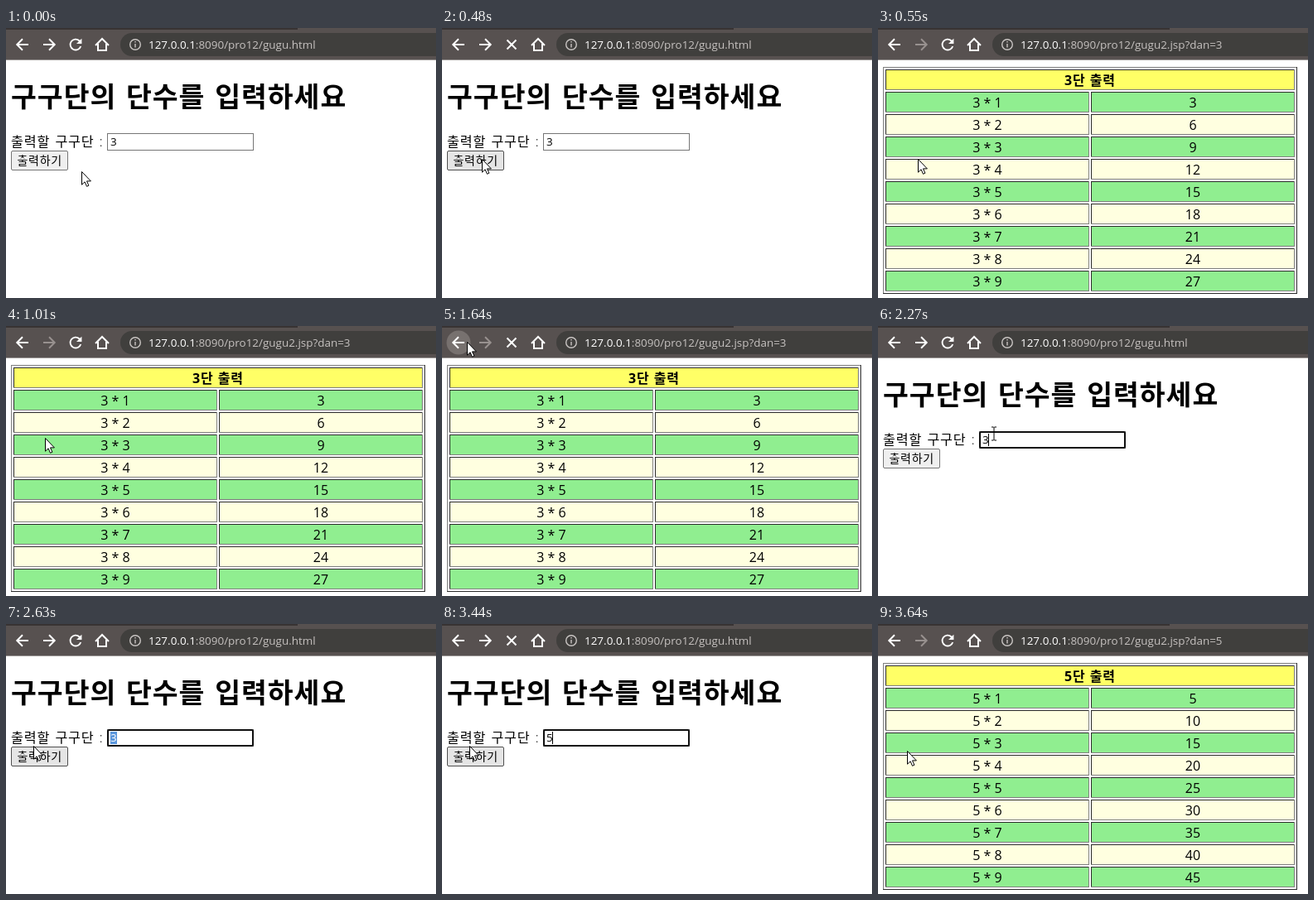
An HTML page that plays this animation: 519 px wide and 326 px high, repeating every 3.84 s.

```html
<!DOCTYPE html>
<html lang="ko">
<head>
<meta charset="utf-8">
<title>구구단</title>
<style>
  html, body { margin: 0; width: 100%; height: 100%; overflow: hidden; background: #fff; }
  svg { display: block; width: 519px; height: 326px; }
  text { font-family: "Open Sans", "Noto Sans CJK KR", "Noto Sans CJK", sans-serif; font-size: 16px; white-space: pre; }
  rect { shape-rendering: crispEdges; }
  .round { shape-rendering: auto; }
  .icon { fill: #fff; }
  .line { fill: none; stroke: #fff; stroke-width: 2; }
  .mid { text-anchor: middle; }
  #title { font-size: 33.5px; font-weight: 700; letter-spacing: 1px; word-spacing: 2px; }
  #label { font-size: 16.2px; font-weight: 300; letter-spacing: .8px; word-spacing: 1.3px; }
  #value { font-size: 13.4px; }
  #url { font-size: 13.45px; fill: #c6c2c0; }
  #url .host { fill: #fff; }
  #button text { font-size: 14px; font-weight: 300; letter-spacing: .7px; }
  #button rect { fill: #efefef; stroke: #767676; }
  #button.hover rect { fill: #e5e5e5; stroke: #4f4f4f; }
  #button.press rect { fill: #f5f5f5; stroke: #8d8d8d; }
</style>
</head>
<body>
<svg viewBox="0 0 519 326">
  <g id="form">
    <text id="title" x="6" y="95">구구단의 단수를 입력하세요</text>
    <text id="label" x="6" y="142.5">출력할 구구단 :</text>
    <rect id="box" x="122.5" y="127.5" width="176" height="20" fill="#fff" stroke="#767676"/>
    <rect id="ring" class="round" x="123" y="128" width="175" height="19" rx="1.5" fill="#fff" stroke="#101010" stroke-width="2"/>
    <rect id="mark" x="126" y="130" width="8" height="15" fill="#5a96dc"/>
    <text id="value" x="126" y="142">3</text>
    <rect id="caret" x="133" y="130" width="1" height="15"/>
    <g id="button">
      <rect class="round" x="6.5" y="148.5" width="68" height="23" rx="1.5"/>
      <text x="13.5" y="165">출력하기</text>
    </g>
  </g>
  <g id="table"></g>

  <rect width="519" height="38" fill="#575150"/>
  <rect y="38" width="519" height="1" fill="#9a9695"/>
  <rect width="352" height="2" fill="#383333"/>
  <rect class="round" x="138" y="6" width="420" height="28" rx="14" fill="#403f3d"/>
  <circle id="halo" cx="20" cy="20" r="14.5" fill="#77716f"/>
  <path class="line" d="M27 20H14M20 13.3L13.3 20 20 26.7"/>
  <path id="forward" class="line" d="M45 20H58M52 13.3L58.7 20 52 26.7"/>
  <path id="reload" class="icon" transform="translate(73 9) scale(.92)" d="M17.65 6.35A8 8 0 1 0 19.73 14h-2.08A6 6 0 1 1 16.22 7.78L13 11h7V4z"/>
  <path id="stop" class="line" d="M78.5 14.5l11 11m0-11l-11 11"/>
  <path class="line" d="M108 21L116 13 124 21M111 19V27H121V19"/>
  <g fill="none" stroke="#c9c5c3" stroke-width="1.4">
    <circle cx="156" cy="20" r="6.3"/>
    <path d="M156 19v4.5M156 16v1.6"/>
  </g>
  <text id="url" x="172" y="25"><tspan class="host">127.0.0.1</tspan><tspan id="path"></tspan></text>

  <g id="cursor">
    <path id="arrow" d="M.5.5V16.2L4.1 12.8 6.5 18.3 8.9 17.2 6.5 11.9H11.4Z" fill="#fff" stroke="#000"/>
    <path id="beam" d="M-3-8h2.5l.5.5.5-.5H3M0-7.5V7.5M-3 8h2.5l.5-.5.5.5H3" fill="none" stroke="#000"/>
  </g>
</svg>
<script>
const LOOP = 3840, STEP = 70;
const $ = id => document.getElementById(id);
const show = (id, on) => { $(id).style.display = on ? '' : 'none'; };
const within = (t, a, b) => t >= a && t < b;

// Each move: start time, number of steps, destination x and y
const moves = [
  [70, 3, 48, 158],
  [1010, 1, 47, 135],
  [1080, 7, 24, 21],
  [1570, 2, 30, 19],
  [1780, 5, 108, 89],
  [2130, 2, 140, 130],
  [2340, 5, 33, 147],
  [3570, 2, 35, 153]
];

function cursorAt(t) {
  let x = 91, y = 173;
  for (const [start, steps, tx, ty] of moves) {
    if (t < start) break;
    const u = Math.min(1, (Math.floor((t - start) / STEP) + 1) / steps);
    const k = 1 - (1 - u) ** 1.4;
    x += (tx - x) * k;
    y += (ty - y) * k;
  }
  return [Math.round(x), Math.round(y)];
}

// One pixel bevel: light and dark sides around a fill
function bevel(x, y, w, h, topLeft, bottomRight, fill) {
  const rect = (x, y, w, h, c) => `<rect x="${x}" y="${y}" width="${w}" height="${h}" fill="${c}"/>`;
  return rect(x, y, w, h, bottomRight) + rect(x, y, w - 1, h - 1, topLeft) +
    rect(x + 1, y + 1, w - 2, h - 2, fill);
}

function tableMarkup(dan) {
  const dark = '#2c2c2c', gray = '#808080';
  const cell = (x, row, w, fill, text, style = '') => {
    const y = 50 + 27 * row;
    return bevel(x, y, w, 25, dark, gray, fill) +
      `<text class="mid" x="${x + w / 2}" y="${y + 19}" style="${style}">${text}</text>`;
  };
  let out = bevel(6, 47, 500, 274, gray, dark, '#fff') +
    cell(9, 0, 494, '#ffff66', dan + '단 출력', 'font-weight:700;letter-spacing:.9px');
  for (let i = 1; i < 10; i++) {
    const fill = i % 2 ? '#90ee90' : '#ffffe0';
    out += cell(9, i, 246, fill, `${dan} * ${i}`) + cell(257, i, 246, fill, dan * i);
  }
  return out;
}

let shown = -1;
function setPage(dan) {
  if (dan === shown) return;
  shown = dan;
  show('form', !dan);
  show('table', dan);
  if (dan) $('table').innerHTML = tableMarkup(dan);
  $('path').textContent = ':8090/pro12/' + (dan ? 'gugu2.jsp?dan=' + dan : 'gugu.html');
  $('forward').style.stroke = dan ? '#98918f' : '#fff';
}

function draw(t) {
  const [x, y] = cursorAt(t);
  setPage(within(t, 550, 1710) ? 3 : t >= 3510 ? 5 : 0);

  const loading = within(t, 480, 550) || within(t, 1640, 1710) || within(t, 3440, 3510);
  show('stop', loading);
  show('reload', !loading);
  show('halo', t >= 1570 && Math.hypot(x - 20, y - 20) < 15);

  const over = within(x, 6, 75) && within(y, 147, 172);
  $('button').setAttribute('class', within(t, 410, 480) ? 'press' : over ? 'hover' : '');

  const selected = within(t, 2340, 3160), typed = t >= 3160;
  show('ring', t >= 2270);
  $('value').textContent = typed ? 5 : 3;
  $('value').style.fill = selected ? '#fff' : '#000';
  show('mark', selected);
  show('caret', typed || within(t, 2270, 2340));

  const beam = within(t, 2200, 2620);
  show('beam', beam);
  show('arrow', !beam);
  $('cursor').setAttribute('transform', `translate(${x} ${y})`);
}

const begin = performance.now();
function tick() {
  draw((performance.now() - begin) % LOOP);
  requestAnimationFrame(tick);
}
tick();
</script>
</body>
</html>
```
